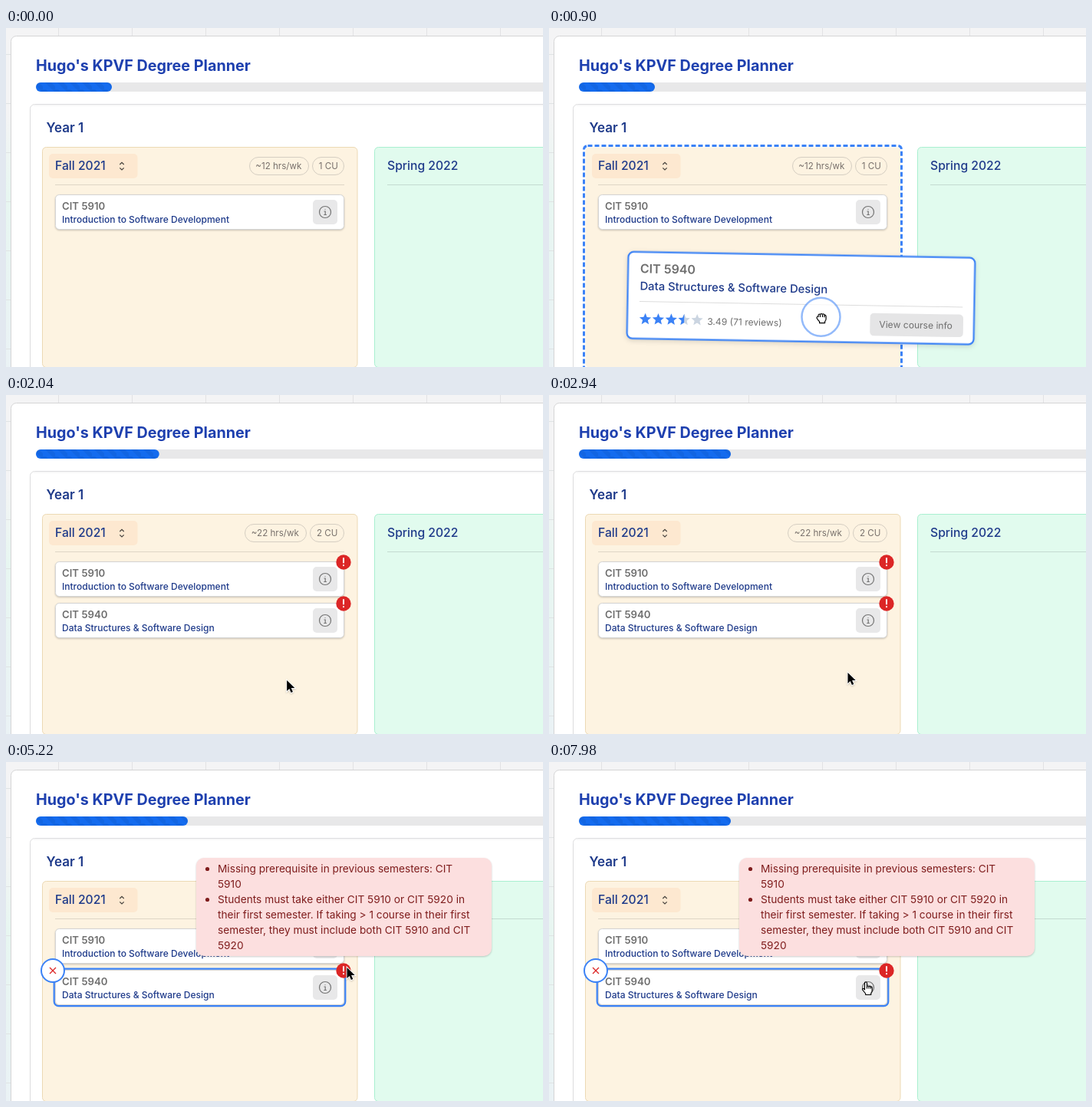
Animation of 700x442 px, one loop 8 s. Source, as an HTML page:

```html
<!DOCTYPE html>
<html lang="en">
<head>
<meta charset="utf-8">
<title>Degree planner</title>
<style>
html, body { margin: 0; width: 100%; height: 100%; overflow: hidden; background: #f4f4f5; }
svg { display: block; width: 100%; height: 100%; }
text { font-family: Inter, "Open Sans", sans-serif; font-weight: 500; fill: #1e3a8a; white-space: pre; }
.title { font-size: 19.75px; font-weight: 700; fill: #1e40af; }
.year { font-size: 17px; font-weight: 600; }
.term { font-size: 15.7px; }
.pill text { font-size: 11.6px; font-weight: 400; fill: #78716c; }
.pill rect { fill: none; stroke: #d5cec2; }
.code { font-size: 13.2px; font-weight: 600; fill: #6e6e6e; }
.name { font-size: 12.03px; }
.big .code { font-size: 16px; }
.big .name { font-size: 14.8px; }
.big .meta { font-size: 12.1px; font-weight: 400; fill: #6e6e6e; }
.tip text { font-size: 13.68px; font-weight: 400; fill: #7f1d1d; }
.card { fill: #fff; stroke: #d4d4d4; }
.ring { fill: none; stroke: #3b82f6; }
.soft { filter: drop-shadow(0 1px 1px #0003); }
.lift { filter: drop-shadow(0 2px 3px #0002); }
</style>
</head>
<body>
<svg id="stage" viewBox="0 0 700 442" preserveAspectRatio="none"></svg>
<script>
const LOOP = 8000;
const DROP = 1690, LANDED = 1940, HOVER = 3780;

const text = (cls, x, y, value) => `<text class="${cls}" x="${x}" y="${y}">${value}</text>`;
const rect = (x, y, w, h, r, attrs) =>
  `<rect x="${x}" y="${y}" width="${w}" height="${h}" rx="${r}" ${attrs}/>`;
const group = (id, body, attrs = '') => `<g id="${id}" ${attrs}>${body}</g>`;
const line = (x1, y1, x2, y2, color) => `<path d="M${x1} ${y1}L${x2} ${y2}" stroke="${color}"/>`;

const pill = (x, w, tx, label) =>
  `<g class="pill">${rect(x + .5, 168.5, w - 1, 23, 11.5, '')}${text('', tx, 184.2, label)}</g>`;

const warning = y => `<circle cx="440" cy="${y}" r="9.7" fill="#dc2626"/>
  <path d="M440 ${y - 5}v5.5M440 ${y + 4}v.3" stroke="#fff" stroke-width="2" stroke-linecap="round"/>`;

const courseCard = (y, code, name) => `
  ${rect(64.5, y + .5, 376, 45, 5, 'class="card soft"')}
  ${text('code', 73, y + 19.8, code)}${text('name', 73, y + 37.2, name)}
  ${rect(400, y + 7, 32, 32, 5, 'fill="#e8e8e9"')}
  <circle cx="416" cy="${y + 23}" r="7.5" fill="none" stroke="#737373" stroke-width="1.2"/>
  <path d="M414.5 ${y + 22}h1.7v4.5M414.3 ${y + 26.5}h3.6M416 ${y + 19.3}v.8" fill="none" stroke="#737373" stroke-width="1.2"/>`;

// Points 0..5 trace the right half, 5..10 the left half.
function star(cx, cy, from, to, color) {
  const points = [];
  for (let i = from; i <= to; i++) {
    const r = i % 2 ? 3.6 : 8, a = i * Math.PI / 5;
    points.push(`${(cx + r * Math.sin(a)).toFixed(2)},${(cy - r * Math.cos(a)).toFixed(2)}`);
  }
  return `<polygon points="${points.join(' ')}" fill="${color}"/>`;
}

function stars() {
  let out = '';
  for (let i = 0; i < 5; i++) {
    const x = 24 + i * 16.9;
    out += star(x, 88.3, 0, 10, i < 3 ? '#3b82f6' : '#cbd5e1');
    if (i === 3) out += star(x, 88.3, 5, 10, '#3b82f6');
  }
  return out;
}

const draggedCard = `
  ${rect(.5, .7, 452, 113, 7, 'fill="#fff" stroke="#3b82f6" stroke-width="2.2" class="lift"')}
  ${text('code', 16.3, 28, 'CIT 5940')}
  ${text('name', 16.3, 50.2, 'Data Structures &amp; Software Design')}
  ${line(16, 65.2, 437.5, 65.2, '#dcdcdc')}${stars()}
  ${text('meta', 104.8, 94, '3.49 (71 reviews)')}
  ${rect(317, 75, 121.5, 29.5, 5, 'fill="#e5e5e6"')}
  ${text('meta', 329, 94, 'View course info')}`;

const tipLines = [
  'Missing prerequisite in previous semesters: CIT', '5910',
  'Students must take either CIT 5910 or CIT 5920 in',
  'their first semester. If taking &gt; 1 course in their first',
  'semester, they must include both CIT 5910 and CIT', '5920'];
const tooltip = rect(248, 125, 385, 128, 10, 'fill="#fcdfdf" class="soft"') +
  tipLines.map((s, i) => text('', 276, 144 + i * 20, s)).join('') +
  [139.5, 179.5].map(y => `<circle cx="262.5" cy="${y}" r="2.6" fill="#7f1d1d"/>`).join('');

let grid = '';
for (let x = 68.5; x < 700; x += 96) grid += line(x, 0, x, 11, '#e2e2e4');
for (let y = 34.5; y < 442; y += 64) grid += line(0, y, 7, y, '#dfe3e4');

document.getElementById('stage').innerHTML = `
  <defs>
    <pattern id="stripes" width="16" height="16" patternUnits="userSpaceOnUse">
      <rect width="16" height="16" fill="#146bee"/>
      <path d="M0 0H4L16 12V16H12L0 4ZM12 0H16V4Z" fill="#1265e2"/>
    </pattern>
    <linearGradient id="edge" x2="0" y2="1">
      <stop offset=".25" stop-color="#f4f4f5"/><stop offset=".5" stop-color="#e7f6f1"/>
      <stop offset="1" stop-color="#eaf2f5"/>
    </linearGradient>
  </defs>
  <rect width="700" height="442" fill="#f4f4f5"/>
  <rect width="8" height="442" fill="url(#edge)"/>
  ${grid}
  ${rect(6.5, 10.5, 720, 460, 7, 'fill="#fff" stroke="#d4d4d5"')}
  ${text('title', 39, 56, "Hugo's KPVF Degree Planner")}
  ${rect(39, 71, 700, 12, 6, 'fill="#e8e8e9"')}
  ${rect(39, 71, 99, 12, 6, 'fill="url(#stripes)" id="progress"')}
  ${rect(31.5, 99.5, 700, 400, 6, 'fill="#fff" stroke="#dcdcde"')}
  ${line(36, 101, 700, 101, '#f1f1f2')}
  ${text('year', 52.5, 136, 'Year 1')}
  ${rect(47.5, 155.5, 410.5, 287, 5, 'fill="#fdf3e1" stroke="#ecd9b4" id="fall"')}
  ${rect(45.5, 153.5, 414, 310, 5, 'class="ring" fill-opacity="1" stroke-width="3" stroke-dasharray="6 3" id="dashes"')}
  ${rect(480.5, 155.5, 240, 287, 5, 'fill="#e1fbee" stroke="#a9efd0"')}
  ${rect(56, 164, 115.5, 32, 5, 'fill="#fde8d0"')}
  ${text('term', 64, 185.4, 'Fall 2021')}
  <path d="M148.3 178l2.7-2.7 2.7 2.7M148.3 182.3l2.7 2.7 2.7-2.7" fill="none" stroke="#44403c" stroke-width="1.2"/>
  ${line(64, 204.5, 441, 204.5, '#ded6c6')}
  ${text('term', 497, 185.4, 'Spring 2022')}
  ${line(497, 204.5, 700, 204.5, '#c4dbd0')}
  ${group('before', pill(317, 78, 325.3, '~12 hrs/wk') + pill(399, 42, 407.8, '1 CU'))}
  ${group('after', pill(311, 81, 319.8, '~22 hrs/wk') + pill(396, 45, 405, '2 CU'))}
  ${courseCard(217, 'CIT 5910', 'Introduction to Software Development')}
  ${group('firstWarning', warning(218))}
  ${group('second', courseCard(271, 'CIT 5940', 'Data Structures &amp; Software Design') +
    group('hover', rect(62.7, 269.6, 379.6, 48.6, 6, 'class="ring" stroke-width="2.2"')) + warning(272))}
  ${group('remove', `<circle cx="61" cy="272" r="15" fill="#fff" stroke="#3b82f6" stroke-width="2"/>
    <path d="M57 268l8 8M65 268l-8 8" stroke="#dc2626" stroke-width="1.3"/>`)}
  ${group('tip', tooltip, 'class="tip"')}
  ${group('drag', draggedCard, 'class="big"')}
  <circle id="press" stroke="#3b82f6" fill="#fff"/>
  ${group('cursor', `
    ${group('grab', `<path d="M-6-1q0-2 2-1.5v-2q.5-2 2.5-1.2q1.5-1.5 3-.1q2-.8 2.6 1q2-.2 2 2v3q0 2-1.5 3.5v2h-7v-2q-2-1.5-3.6-4.7z
      M-1.5-5v3M1.5-5v3M4-4.3v2.5" fill="#fff" stroke="#000" stroke-width="1.2" stroke-linejoin="round"/>`,
      'transform="translate(1 1)"')}
    ${group('arrow', '<path d="M0 0v14l3.2-3 2.2 5 2.4-1-2.2-5h4.6z" stroke="#fff" paint-order="stroke" stroke-width="1.8"/>', 'class="soft"')}
    ${group('hand', `<path d="M-1.5 1.5q0-1.7 1.5-1.7t1.5 1.7v4q1.2-1 2.5 0q1.4-.8 2.4.4q1.8-.4 1.8 1.6v3.5q0 2-1.5 3.5v2h-7v-1.5l-4-5q-.6-1.8 1.3-1.7l1.5 1.5z
      M1.5 5v3.5M4 5.5v3M6.4 6v2.5" fill="#fff" stroke="#000" stroke-width="1.2" stroke-linejoin="round"/>`)}`)}`;

const $ = id => document.getElementById(id);
const linear = u => u;
const smooth = u => u * u * (3 - 2 * u);
const out = u => 1 - (1 - u) ** 3;
const span = (t, from, length) => Math.min(1, Math.max(0, (t - from) / length));

// Rows: time, x, y, easing towards this row.
const pointer = [
  [540, 1015, 470, linear], [840, 465, 394, linear], [900, 354, 378, linear],
  [1010, 336, 375, out], [1600, 368, 378, smooth], [1740, 366, 376, smooth],
  [1940, 364, 373, smooth], [2500, 389.5, 362, smooth], [3400, 389.5, 362, linear],
  [4150, 447, 270, smooth], [4500, 447, 270, linear], [4900, 444.5, 268, smooth],
  [7650, 444.5, 268, linear], [7950, 413, 287, smooth]];

function at(rows, t) {
  const i = rows.findIndex(row => row[0] > t);
  if (i === 0) return rows[0].slice(1, 3);
  if (i < 0) return rows.at(-1).slice(1, 3);
  const a = rows[i - 1], b = rows[i], u = b[3]((t - a[0]) / (b[0] - a[0]));
  return [a[1] + (b[1] - a[1]) * u, a[2] + (b[2] - a[2]) * u];
}

const show = (id, on) => $(id).setAttribute('visibility', on ? 'inherit' : 'hidden');
const set = (id, attrs) => { for (const k in attrs) $(id).setAttribute(k, attrs[k]); };

function render(t) {
  const [x, y] = at(pointer, t);
  const dropped = t >= DROP, landed = t >= LANDED;
  const over = t >= 870 && !dropped;

  show('dashes', over);
  set('fall', { 'stroke-opacity': over ? 0 : 1 });
  show('before', !dropped);
  show('after', dropped);
  show('firstWarning', dropped);
  show('second', landed);
  show('hover', t >= HOVER);
  show('remove', t >= HOVER);
  show('drag', t > 540 && !landed);
  show('grab', t > 540 && !landed);
  show('arrow', landed && t < 7810);
  show('hand', t >= 7810);
  set('cursor', { transform: `translate(${x} ${y})` });
  set('progress', { width: 99 + 99 * smooth(span(t, 1690, 600)) });

  const [cx, cy] = dropped
    ? at([[DROP, 346, 347.5, linear], [1740, 344.5, 346, linear], [LANDED, 290, 327, out]], t)
    : [x - 26 + 5 * span(t, 1010, 590), y - 26 - 4 * span(t, 1010, 590)];
  set('drag', { transform: `translate(${cx} ${cy}) rotate(1) translate(-226 -57)` });

  const release = span(t, DROP, 210);
  show('press', t > 540 && release < 1);
  set('press', {
    cx: x + .5, cy: y - 1.3, r: 25 + 20 * release,
    'stroke-width': Math.max(.8, 2.5 - 6.5 * release),
    'stroke-opacity': release ? .85 * (1 - release) : .55,
    'fill-opacity': .75 * (1 - release)
  });

  const open = span(t, 4225, 150);
  const scale = .9 + .1 * open;
  show('tip', open > 0);
  set('tip', {
    opacity: Math.min(1, open * 1.7),
    transform: `translate(440.5 253) scale(${scale}) translate(-440.5 -253)`
  });
}

let start;
function frame(now) {
  start ??= now;
  render((now - start) % LOOP);
  requestAnimationFrame(frame);
}
render(0);
requestAnimationFrame(frame);
</script>
</body>
</html>
```
